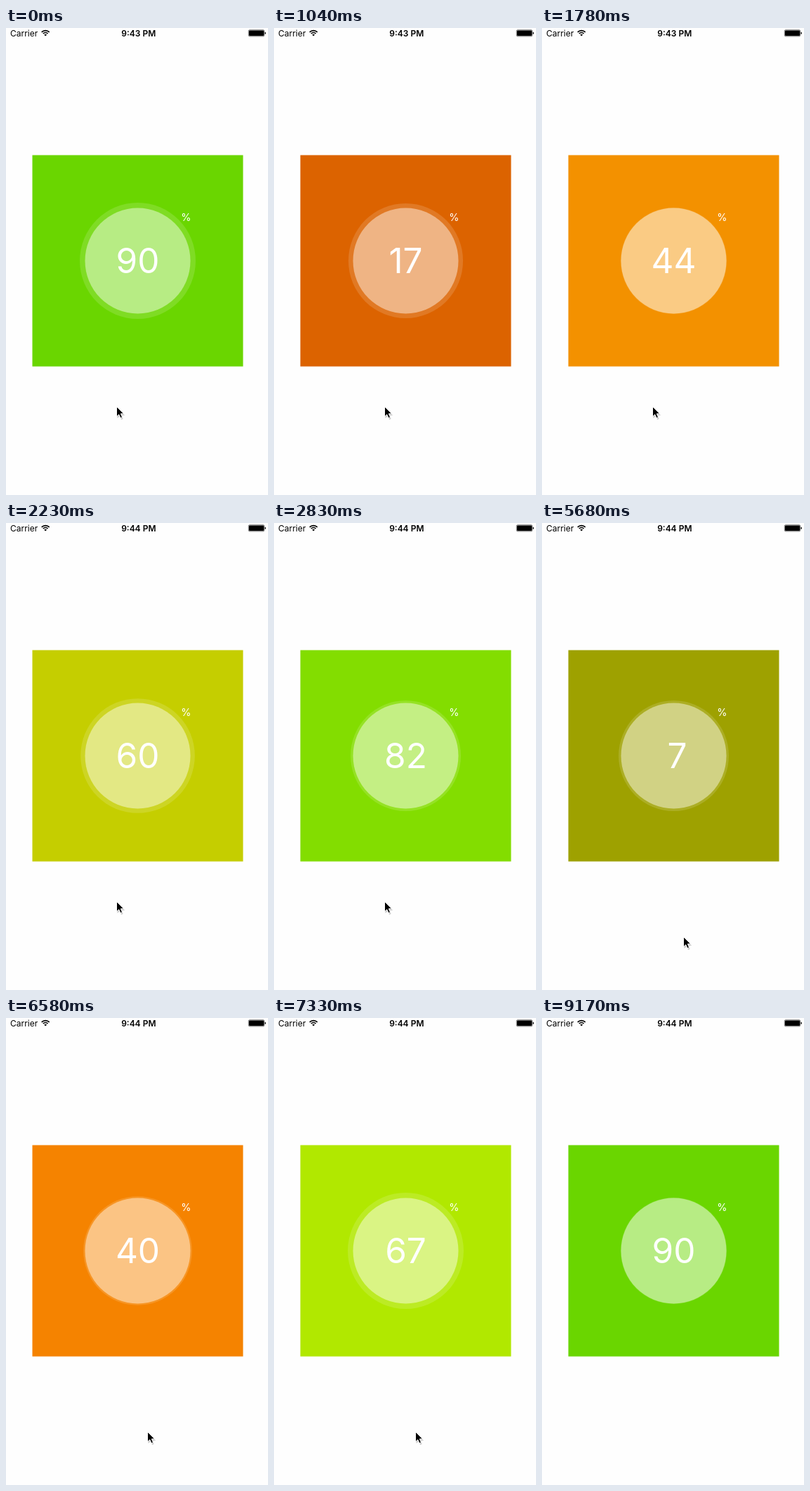
Write an HTML page that moves like this. It is 373 px wide and 663 px high and loops after 9270 ms.

```html
<!DOCTYPE html>
<html lang="en">
<head>
<meta charset="utf-8">
<title>Charge gauge</title>
<style>
  html, body { margin: 0; width: 100%; height: 100%; overflow: hidden; background: #fefefe; }
  svg { display: block; width: 100%; height: 100%; }
  text { font-family: Inter, Roboto, sans-serif; }
  .mid { text-anchor: middle; }
  .wifi { fill: none; stroke: #000; stroke-width: 1.7; }
</style>
</head>
<body>
<svg viewBox="0 0 373 663">
  <text x="6" y="11.5" font-size="12">Carrier</text>
  <path class="wifi" d="M50.7 5.9a7.8 7.8 0 0 1 11 0M52.8 8a4.9 4.9 0 0 1 6.8 0"/>
  <path d="M56.2 11.6l-1.9-2a2.7 2.7 0 0 1 3.8 0z"/>
  <text id="clock" class="mid" x="188.8" y="11.5" font-size="12" font-weight="600"></text>
  <rect x="345.3" y="2.8" width="22.4" height="9" rx="1.6" fill="none" stroke="#000" stroke-width=".6"/>
  <rect x="346" y="3.5" width="21" height="7.6" rx="1"/>
  <path d="M368.5 5.6q1.4 .3 1.4 1.7t-1.4 1.7z"/>

  <rect id="panel" x="37.5" y="180.5" width="300" height="300"/>
  <circle id="ring" cx="187.5" cy="330.5" fill="#fff" fill-opacity=".14"/>
  <circle cx="187.5" cy="330.5" r="75" fill="#fff" fill-opacity=".44"/>
  <text id="count" class="mid" y="348" font-size="49.5" fill="#fff"></text>
  <text class="mid" x="256.3" y="274" font-size="14.5" fill="#fff">%</text>

  <g id="cursor">
    <path d="M1 2v14.5l3.4-3 2.2 5 2.6-1.1-2.1-5h4.6z" fill="#000" opacity=".2"/>
    <path d="M0 0v14.2l3.3-3 2.2 5 2.5-1.1-2.1-4.9h4.4z" stroke="#fff" stroke-width="1"/>
  </g>
</svg>
<script>
const $ = id => document.getElementById(id);
const LOOP = 9270, STEP = 150, RUNS = [550, 5460], RATE = 36 / 1000;
const PEAK = 3645, PULSE = 1225;
// colours at each quarter of a count, 0 to 90
const COLORS = [[106, 214, 0], [254, 64, 0], [243, 148, 0], [176, 233, 0], [106, 214, 0]];

const clamp = x => Math.max(0, Math.min(1, x));
const mix = (a, b, k) => a + (b - a) * k;
const ease = x => x * x * (3 - 2 * x);

function charge(t) {
  if (t < RUNS[0]) return 90;
  return Math.min(90, (t - RUNS[t < RUNS[1] ? 0 : 1]) * RATE);
}

function color(value) {
  const q = value / 22.5, i = Math.min(3, Math.floor(q));
  return `rgb(${COLORS[i].map((c, n) => Math.round(mix(c, COLORS[i + 1][n], q - i)))})`;
}

function radius(t) {
  const phase = (t - PEAK) / PULSE;
  const away = 2 * Math.abs(phase - Math.round(phase)); // 0 at the peak, 1 at rest
  return 75 + 7.5 * (1 - away ** 1.6);
}

function draw(now) {
  // the picture advances in steps
  const t = Math.floor((now % LOOP - 130) / STEP) * STEP + 130;
  const value = charge(t), n = Math.floor(value);
  $("clock").textContent = t < 2000 ? "9:43 PM" : "9:44 PM";
  $("panel").setAttribute("fill", color(value));
  $("ring").setAttribute("r", radius(t));
  $("count").textContent = n;
  $("count").setAttribute("x", n < 10 ? 192.5 : 187.5);

  const move = ease(clamp((t - 4700) / 600)), leave = clamp((t - 7400) / 450) ** 2;
  const x = mix(157.5, 201.5, move) + 12 * leave;
  const y = mix(537.5, 587.5, move) + 90 * leave;
  $("cursor").setAttribute("transform", `translate(${x} ${y})`);
}

const start = performance.now();
function tick() {
  draw(performance.now() - start);
  requestAnimationFrame(tick);
}
tick();
</script>
</body>
</html>
```
